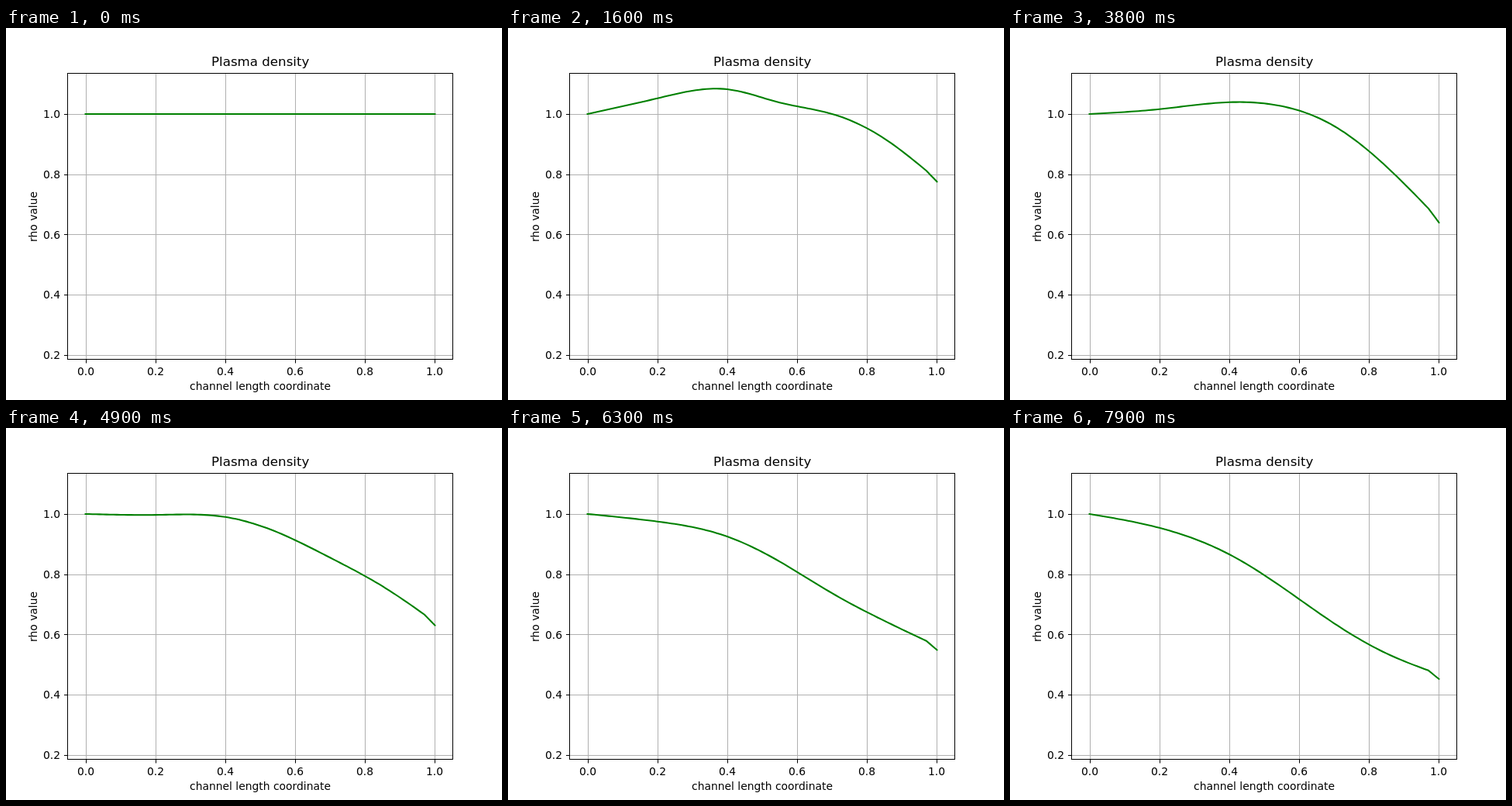
Recreate the animation shown at these times as an HTML page with a canvas. Size 640 px wide and 480 px high, loop 8000 ms.

```html
<!DOCTYPE html>
<html lang="en">
<head>
<meta charset="utf-8">
<title>Plasma density</title>
<style>
html, body { margin: 0; width: 100%; height: 100%; overflow: hidden; background: #fff; }
canvas { display: block; width: 640px; height: 480px; }
</style>
</head>
<body>
<canvas id="plot" width="640" height="480"></canvas>
<script>
const ctx = document.getElementById('plot').getContext('2d');
const LOOP = 8000, STEP = 100;
const LEFT = 79.5, RIGHT = 576.5, TOP = 58.5, BOTTOM = 427.5;

const px = z => 102.55 + 450.9 * z;
const py = rho => 110.95 - 388.6 * (rho - 1);

// Key points: density above or below 1, in thousandths, by moment and channel position.
const POS = [0, .2, .4, .55, .7, .85, 1];
const KEYS = [
  { t: 0, d: [0, 0, 0, 0, 0, 0, 0] },
  { t: 1.6, d: [0, 52, 82, 38, 0, -82, -218] },
  { t: 3, d: [0, 31, 70, 78, 6, -166, -321] },
  { t: 3.8, d: [0, 16, 39, 26, -40, -175, -350] },
  { t: 4.9, d: [0, -3, -10, -61, -145, -240, -359] },
  { t: 6.3, d: [0, -25, -75, -158, -263, -355, -438] },
  { t: 7.9, d: [0, -46, -134, -242, -363, -463, -532] }
];

// Natural cubic spline; the curvatures are found by relaxation.
function spline(xs, ys) {
  const n = xs.length - 1;
  const curv = xs.map(() => 0);
  const gap = i => xs[i + 1] - xs[i];
  const slope = i => (ys[i + 1] - ys[i]) / gap(i);
  for (let pass = 0; pass < 25; pass++) {
    for (let i = 1; i < n; i++) {
      const a = gap(i - 1), b = gap(i);
      curv[i] = (6 * (slope(i) - slope(i - 1)) - a * curv[i - 1] - b * curv[i + 1]) / (2 * (a + b));
    }
  }
  return x => {
    let i = 0;
    while (i < n - 1 && x > xs[i + 1]) i++;
    const h = gap(i), u = (x - xs[i]) / h, v = 1 - u;
    return v * ys[i] + u * ys[i + 1]
      + h * h / 6 * ((v ** 3 - v) * curv[i] + (u ** 3 - u) * curv[i + 1]);
  };
}

const tracks = POS.map((_, k) => spline(KEYS.map(key => key.t), KEYS.map(key => key.d[k] / 1000)));

// Density profile at time t, with a small extra drop at the outlet.
function profile(t) {
  const shift = spline(POS, tracks.map(f => f(t)));
  const outlet = .03 * shift(1);
  return z => 1 + shift(z) + outlet * Math.max(0, (z - .97) / .03);
}

function line(x1, y1, x2, y2, color) {
  ctx.strokeStyle = color;
  ctx.beginPath();
  ctx.moveTo(x1, y1);
  ctx.lineTo(x2, y2);
  ctx.stroke();
}

// anchor: 0 = left, .5 = centre, 1 = right; the start falls on a whole pixel.
function text(str, x, y, anchor = .5, size = 13.89) {
  ctx.font = size + 'px "DejaVu Sans", sans-serif';
  ctx.fillText(str, Math.round(x - anchor * ctx.measureText(str).width), y);
}

function drawGrid() {
  ctx.lineWidth = 1;
  ctx.lineCap = 'butt';
  ctx.fillStyle = '#000';
  for (let i = 0; i <= 5; i++) {
    const value = i / 5, label = value.toFixed(1);
    const x = Math.round(px(value)) + .5;
    line(x, TOP, x, BOTTOM, '#b0b0b0');
    line(x, BOTTOM, x, BOTTOM + 5, '#000');
    text(label, px(value), 448);
    if (i === 0) continue;
    const y = Math.round(py(value)) + .5;
    line(LEFT, y, RIGHT, y, '#b0b0b0');
    line(LEFT - 4.5, y, LEFT, y, '#000');
    text(label, 70.3, Math.round(py(value) + 5.2), 1);
  }
}

function drawCurve(t) {
  const rho = profile(t);
  ctx.beginPath();
  for (let z = 0; z <= 100; z++) ctx.lineTo(px(z / 100), py(rho(z / 100)));
  ctx.strokeStyle = '#008000';
  ctx.lineWidth = 2.08;
  ctx.lineCap = 'square';
  ctx.lineJoin = 'round';
  ctx.stroke();
}

function drawFrame() {
  ctx.lineWidth = 1;
  ctx.lineJoin = 'miter';
  ctx.strokeStyle = '#000';
  ctx.strokeRect(LEFT, TOP, RIGHT - LEFT, BOTTOM - TOP);
  text('Plasma density', 328, 49, .5, 16.67);
  text('channel length coordinate', 328, 467);
  ctx.save();
  ctx.translate(40, 243);
  ctx.rotate(-Math.PI / 2);
  text('rho value', 0, 0);
  ctx.restore();
}

const start = performance.now();

function render(now) {
  const ms = Math.max(0, now - start) % LOOP;
  ctx.fillStyle = '#fff';
  ctx.fillRect(0, 0, 640, 480);
  drawGrid();
  drawCurve(Math.floor(ms / STEP) * STEP / 1000);
  drawFrame();
  requestAnimationFrame(render);
}

render(start);
</script>
</body>
</html>
```
